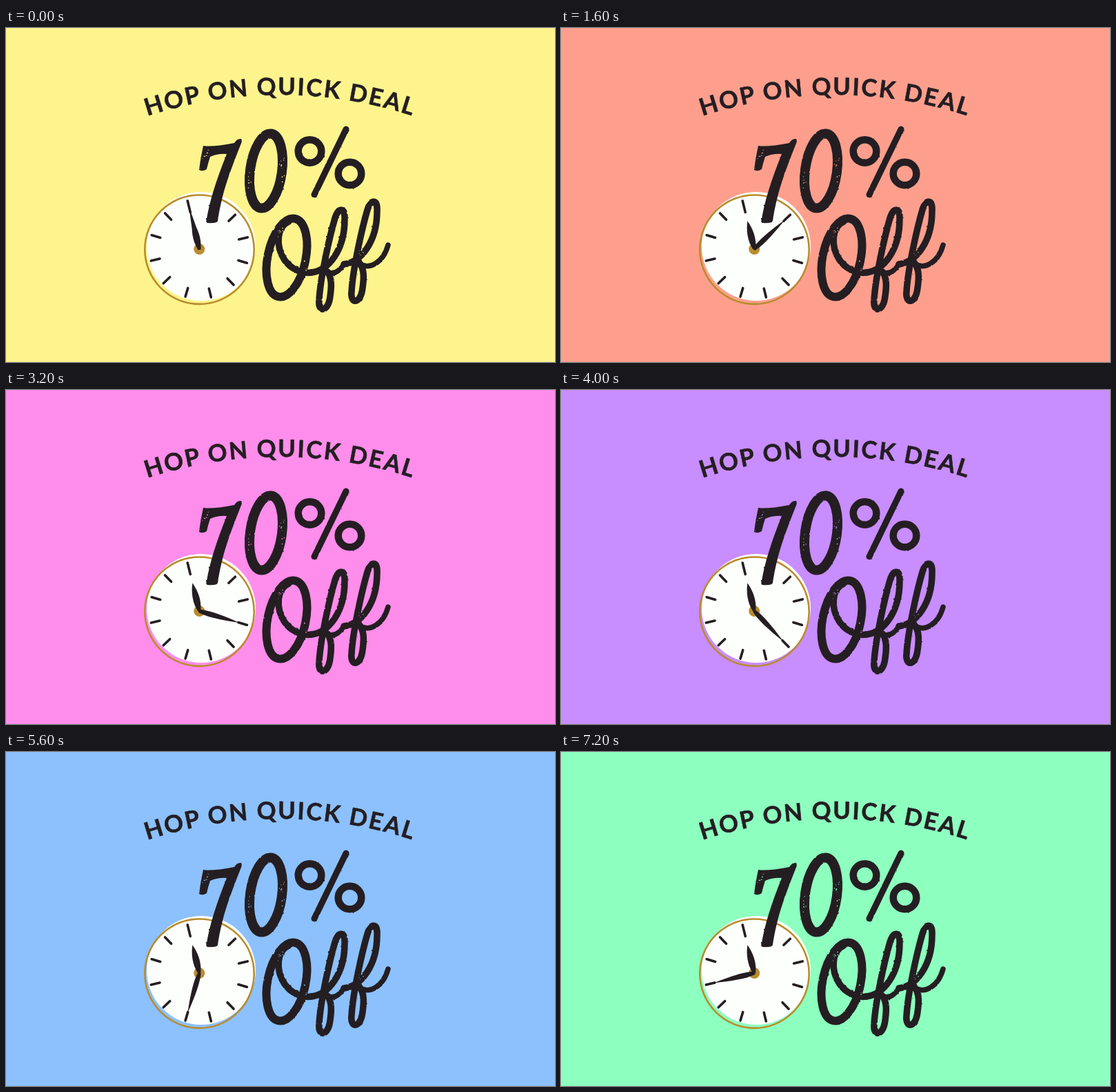
Write an HTML page that moves like this. It is 796 px wide and 485 px high and loops after 8 s.

```html
<!DOCTYPE html>
<html lang="en">
<head>
<meta charset="utf-8">
<title>70% Off</title>
<style>
  html, body { margin: 0; height: 100%; overflow: hidden; }
  svg { display: block; width: 796px; height: 485px; }
  text { font: 700 34.5px Lato, sans-serif; letter-spacing: 2.3px; stroke: #241e22; stroke-width: .6px; }
  .ink { fill: #241e22; }
  .line { fill: none; stroke: #241e22; stroke-linecap: round; stroke-linejoin: round; }
</style>
</head>
<body>
<svg viewBox="0 0 796 485">
  <defs>
    <path id="arc" d="M205 128A616 616 0 0 1 588 127"/>
    <path id="f" d="M443 355C468 352 491 322 491 278C492 260 482 260 477 276C470 300 456 360 454 395C452 413 466 413 469.5 393C472 377 473 363 466 354"/>
    <filter id="rough" color-interpolation-filters="sRGB">
      <feTurbulence type="fractalNoise" baseFrequency=".14" numOctaves="2" seed="4"/>
      <feDisplacementMap in="SourceGraphic" scale="2" xChannelSelector="R" yChannelSelector="G"/>
    </filter>
  </defs>
  <rect id="back" width="796" height="485"/>
  <text class="ink" text-anchor="middle"><textPath href="#arc" startOffset="50.3%">HOP ON QUICK DEAL</textPath></text>

  <circle cx="283" cy="317" r="79" fill="#fdfffc"/>
  <circle cx="280.5" cy="321.7" r="79.2" fill="none" stroke="#b98c2d" stroke-width="2.6"/>
  <g transform="translate(280.3 321) rotate(-13.7)">
    <g id="ticks" class="line" stroke-width="3.6"></g>
    <circle r="8" fill="#b98c2d"/>
    <path class="ink" d="M-2 0C-7 -14 -5 -30 0 -42C5 -30 7 -14 2 0Z"/>
    <path class="ink" id="minute" d="M-2 1C-5 -10 -4 -32 0 -61C4 -32 5 -10 2 1Z"/>
  </g>

  <g filter="url(#rough)">
    <path class="ink" d="M286 171Q300 173 331 167Q335 160 341 161Q343 164 340 170Q320 220 314 245Q309 265 307 280Q306 284 292 283Q289 282 291 277Q297 240 320 183Q308 182 296 187Q293 196 291 205Q285 209 280 206Q282 190 286 171Z"/>
    <g class="line">
      <ellipse transform="translate(377 207.5) rotate(8)" rx="23" ry="54.5" stroke-width="14"/>
      <g stroke-width="10.5">
        <circle cx="440.5" cy="179" r="16.8"/>
        <circle cx="498.5" cy="211.5" r="16.8"/>
        <path d="M493 147L447 242" stroke-width="9"/>
      </g>
      <ellipse transform="translate(407 333.5) rotate(12)" rx="27.5" ry="58" stroke-width="12"/>
      <g stroke-width="9.5">
        <path d="M410 281C393 288 390 316 404 337C414 351 430 357 443 355"/>
        <use href="#f"/>
        <use href="#f" x="47" y="-12"/>
        <path d="M466 354Q478 361 490 343M513 342C526 352 547 341 554 315" stroke-width="7.5"/>
      </g>
    </g>
  </g>
  <g id="specks"></g>
</svg>
<script>
const STEP = 800;
const colors = ['#fef48d', '#fec88d', '#fe9f8d', '#fe8dbd', '#fe8deb',
                '#c88dfe', '#958efd', '#8cc1fd', '#8ef5ff', '#8dffbf'];
const el = id => document.getElementById(id);

function add(parent, tag, attrs) {
  const node = document.createElementNS('http://www.w3.org/2000/svg', tag);
  for (const name in attrs) node.setAttribute(name, attrs[name]);
  parent.append(node);
}

for (let hour = 0; hour < 12; hour++)
  add(el('ticks'), 'path', { d: `M0 ${hour ? -59 : -55}V-72`, transform: `rotate(${hour * 30})` });

let seed = 7;
const random = () => (seed = seed * 16807 % 2147483647) / 2147483647;

// Worn patches in the lettering: centre, spread and number of specks
const patches = [[290, 182, 5, 9, 7], [400, 207, 4, 20, 10], [353, 220, 3, 15, 6],
                 [398, 296, 4, 7, 7], [432, 345, 4, 9, 4], [516, 326, 4, 5, 4]];
for (const [x, y, w, h, count] of patches)
  for (let i = 0; i < count; i++)
    add(el('specks'), 'circle', {
      cx: x + (random() * 2 - 1) * w,
      cy: y + (random() * 2 - 1) * h,
      r: 0.4 + random() * 0.5
    });

function draw() {
  const step = Math.floor(performance.now() / STEP) % colors.length;
  el('back').setAttribute('fill', colors[step]);
  el('specks').setAttribute('fill', colors[step]);
  el('minute').setAttribute('transform', `rotate(${step * 30})`);
  requestAnimationFrame(draw);
}
draw();
</script>
</body>
</html>
```
